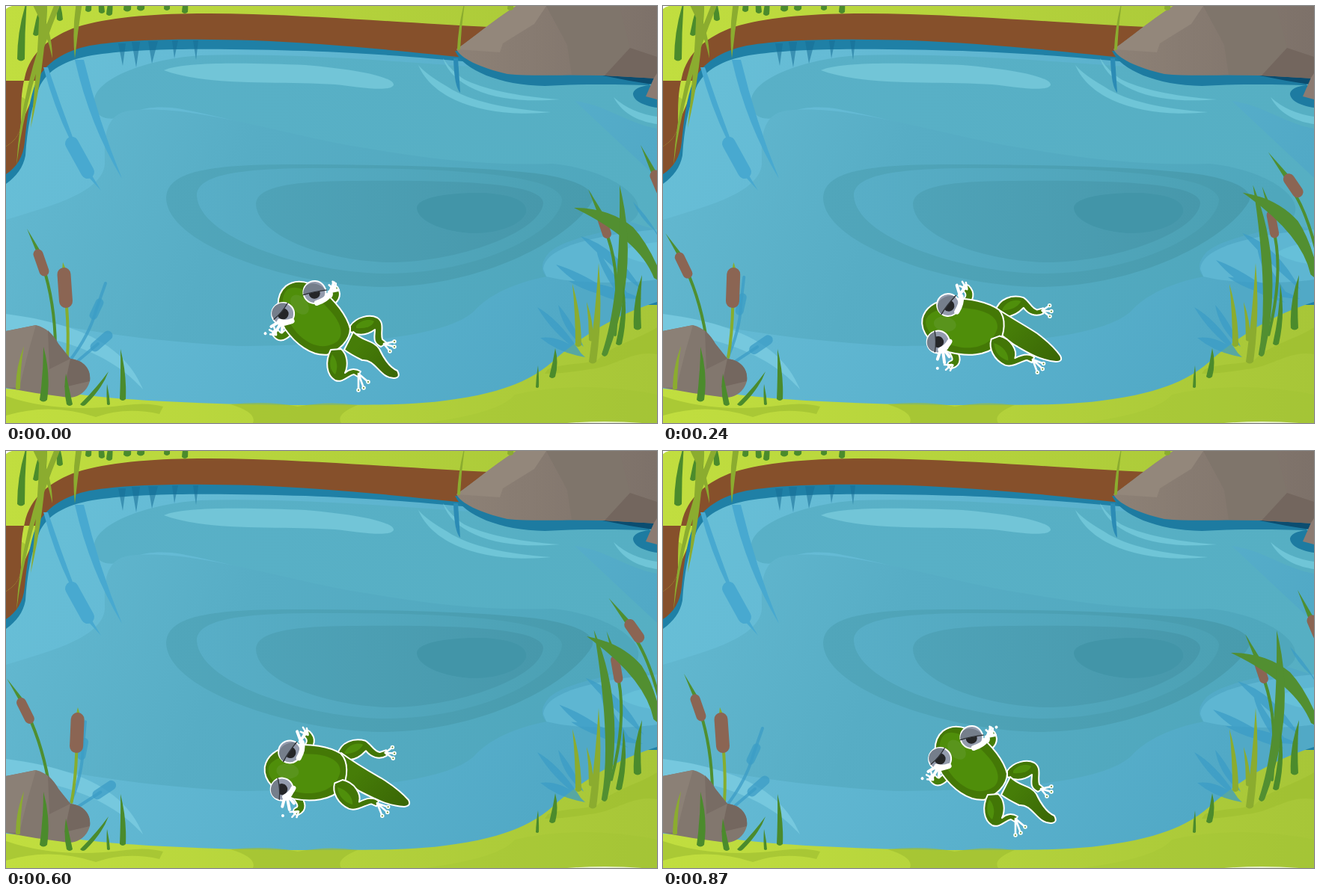
These frames come from a looping animation (870 by 558 pixels, 900 ms). An HTML page:

```html
<!DOCTYPE html>
<html lang="en">
<head>
<meta charset="utf-8">
<title>Frog in a pond</title>
<style>
  html, body { margin: 0; width: 100%; height: 100%; overflow: hidden; background: #b9d63a; }
  svg { display: block; width: 100vw; height: 100vh; }
  .skin { stroke: #fff; stroke-width: 2; stroke-linejoin: round; }
  .line { fill: none; stroke-linecap: round; stroke-linejoin: round; }
  .stem { fill: none; stroke: #4f8f30; stroke-width: 4; stroke-linecap: round; }
  .head { fill: none; stroke: #8b6553; stroke-linecap: round; }
  .mirror { fill: #3b9dc6; opacity: .75; }
  .mirror-line { fill: none; stroke: #3b9dc6; opacity: .75; stroke-linecap: round; }
</style>
</head>
<body>
<svg viewBox="0 0 870 558" preserveAspectRatio="none">
  <defs>
    <linearGradient id="grass"><stop stop-color="#c1de3f"/><stop offset="1" stop-color="#a7c638"/></linearGradient>
    <linearGradient id="water" x2="1" y2=".3"><stop stop-color="#68c0d7"/><stop offset=".25" stop-color="#65bbd5"/><stop offset="1" stop-color="#51a9c6"/></linearGradient>
    <linearGradient id="mid" x2="1" y2=".15"><stop stop-color="#64b9d1"/><stop offset=".4" stop-color="#57adc5"/><stop offset="1" stop-color="#4fa7bc"/></linearGradient>
    <linearGradient id="upper"><stop stop-color="#59b0c7"/><stop offset="1" stop-color="#56afc3"/></linearGradient>
    <linearGradient id="ring"><stop stop-color="#51a6bb"/><stop offset="1" stop-color="#489bad"/></linearGradient>
    <linearGradient id="ringLight"><stop stop-color="#58aec7"/><stop offset="1" stop-color="#4ca1b4"/></linearGradient>
    <linearGradient id="core"><stop stop-color="#4fa3b8"/><stop offset="1" stop-color="#4798ab"/></linearGradient>
    <linearGradient id="stone"><stop stop-color="#8d8176"/><stop offset="1" stop-color="#7d7169"/></linearGradient>
    <linearGradient id="tailSkin" x2="1" y2=".8"><stop offset=".3" stop-color="#467d08"/><stop offset="1" stop-color="#3b6806"/></linearGradient>
  </defs>

  <!-- banks -->
  <rect width="870" height="558" fill="url(#grass)"/>
  <path d="M0 0H8Q3 1 0 4ZM750 558Q800 554 850 558Z" fill="#fff"/>
  <path d="M0 120Q18 118 26 125L20 165 0 186Z" fill="#a9c934"/>
  <path d="M0 188C12 180 19 172 20 158C20 132 20 116 25 96C32 62 60 40 95 28C150 11 240 8 330 11C430 14 560 24 645 28V100H0Z" fill="#86502b"/>
  <path d="M0 188C12 180 19 172 20 158L50 90 60 200 0 240Z" fill="#86502b"/>
  <path d="M0 225C14 216 23 202 25 182C28 150 32 122 40 102C52 76 78 60 112 53C170 43 260 44 330 46C430 50 520 59 640 72H870V400H0Z" fill="#1f80a6"/>
  <path d="M0 238C14 228 23 216 26 200C28 165 34 135 44 110C54 86 80 72 115 66C180 55 300 57 400 60C500 64 570 70 610 74L870 100V396C810 415 770 443 738 469C710 496 680 510 630 521C590 529 555 532 520 533C400 536 200 533 100 520L0 512Z" fill="url(#water)"/>

  <!-- water tones -->
  <path d="M118 128C117 100 180 72 260 66C400 62 560 78 640 82H870V164C830 157 800 132 760 127L870 230V300L600 215C480 200 300 150 235 138C190 130 165 143 148 150C130 153 118 146 118 128Z" fill="url(#upper)"/>
  <path d="M0 286C50 270 128 252 132 212C132 185 128 145 165 140C250 130 380 175 480 190C560 204 640 214 730 211C800 218 850 250 845 275C842 303 760 302 728 328C712 343 716 357 723 362C670 372 640 392 626 408C590 442 470 454 310 455C190 448 120 438 0 414Z" fill="url(#mid)"/>
  <path d="M718 352C720 322 790 306 870 299V366C830 372 760 372 722 362Z" fill="#5eb6d2"/>
  <path d="M820 330Q840 318 870 316V346Q835 342 820 330Z" fill="#66c0d9"/>
  <path d="M0 412C90 424 158 450 183 513C150 476 100 448 0 434Z" fill="#76c8de"/>
  <path d="M211 86C235 74 330 76 400 79C460 84 520 94 518 106C512 116 470 108 440 105C370 100 270 108 211 86Z" fill="#72c5d7"/>
  <path d="M214 256C216 222 270 212 380 212C520 212 660 216 722 226C765 234 790 246 783 262C755 310 640 376 500 376C380 374 214 320 214 256Z" fill="url(#ring)"/>
  <path d="M255 252C258 224 320 217 420 217C560 216 743 222 743 260C738 304 630 360 500 358C390 354 255 308 255 252Z" fill="url(#ringLight)"/>
  <path d="M334 264C336 240 390 234 470 234C600 233 718 236 718 264C714 304 600 344 510 343C420 340 334 306 334 264Z" fill="url(#core)"/>
  <path d="M549 270C550 256 590 250 635 250C680 252 697 262 695 276C690 292 660 304 625 304C590 303 550 290 549 270Z" fill="#4295a8"/>
  <path d="M551 79C572 130 650 150 728 142C670 138 620 128 590 108Q562 92 551 79ZM584 70C598 112 660 132 740 125C680 121 635 110 612 98Q596 88 584 70ZM812 122C825 147 850 155 870 158V148Q835 143 812 122Z" fill="#6fc5d7"/>

  <!-- reflections of the far reeds -->
  <g fill="#48a9d0">
    <path d="M50 82Q64 135 86 180L90 178Q72 130 56 82ZM92 72Q112 160 155 231Q124 155 104 72ZM104 222L127 247 112 222Z"/>
    <path d="M88 184L109 222" class="line" stroke="#48a9d0" stroke-width="18"/>
  </g>
  <path d="M150 50l6 30 4-30M168 48l6 34 5-34M190 47l5 30 8-30M222 46l3 24 5-24M250 46l4 26 3-26" fill="#176d95" opacity=".55"/>

  <!-- right rocks -->
  <path d="M600 60C612 86 660 106 720 107C780 103 840 106 870 106V136C850 133 838 126 838 117Q840 108 860 106L870 70Z" fill="#1d7ba1"/>
  <path d="M598 70h6l3 46q-8-8-9-46Z" fill="#2b8bb5"/>
  <path d="M792 92L870 94V106Q830 100 792 92Z" fill="#0b4d70"/>
  <path d="M602 58C625 42 650 20 682 0H870V97L800 93C760 91 710 95 670 91C632 82 608 70 602 58Z" fill="url(#stone)"/>
  <path d="M602 58C625 42 650 20 682 0H722L706 24 664 50 660 62Z" fill="#93877b"/>
  <path d="M722 0L750 52 756 92 800 93 834 56 820 0Z" fill="#7f756b"/>
  <path d="M834 56L870 68V97L800 93Z" fill="#73665e"/>
  <path d="M855 121L866 96 870 90V125Z" fill="#8c7b72"/>

  <!-- grass patches -->
  <path d="M724 486C745 478 770 480 790 474C812 452 846 446 870 430V466C836 460 812 484 780 486Q745 492 720 492ZM300 533Q350 528 390 536Q430 528 470 534Q440 546 448 558H330Q336 544 300 533ZM0 522Q70 546 160 534Q190 530 210 536L205 546Q160 536 120 550Q60 530 0 548Z" fill="#9fbf30" opacity=".65"/>
  <path d="M680 520Q770 500 870 520V558H560Q660 545 680 520Z" fill="#9dbf33" opacity=".25"/>

  <!-- near reflections -->
  <g data-sway="-17 84 476">
    <path class="mirror-line" stroke-width="4" d="M84 476Q112 440 121 405L133 371"/>
    <path class="mirror-line" stroke-width="11" d="M117 414L125 397"/>
  </g>
  <g data-sway="9 90 480">
    <path class="mirror-line" stroke-width="4" d="M90 480L123 452"/>
    <path class="mirror-line" stroke-width="13" d="M119 456L136 441"/>
  </g>
  <g data-sway="4 850 420" class="mirror">
    <path d="M768 308Q815 322 850 380Q800 342 768 308ZM735 346Q776 358 830 398Q770 384 735 346ZM752 368Q800 368 850 392Q790 392 752 368ZM788 318Q800 345 835 390L815 382Q790 346 788 318Z"/>
  </g>
  <path class="mirror" d="M710 403Q740 420 768 464Q732 440 710 403ZM714 444Q745 440 774 470Q738 464 714 444ZM738 400Q756 420 772 456Q744 434 738 400Z"/>
  <path class="mirror" data-sway="-14 876 387" d="M838 262Q862 286 880 322L866 300Q846 282 838 262Z"/>

  <!-- swaying reeds, left -->
  <g data-sway="-8.8 68 511">
    <path class="stem" d="M66 470Q67 410 53 360"/>
    <path fill="#4f8f30" d="M28 298L46 328 41 330Z"/>
    <path class="head" stroke-width="13" d="M43 332L51 355"/>
  </g>
  <g data-sway="7.8 86 520">
    <path class="stem" stroke="#86ad2e" style="stroke:#86ad2e" d="M82 470Q84 440 81 402"/>
    <path fill="#86ad2e" d="M76 343L80 352H75Z"/>
    <path class="head" stroke-width="18" d="M77.500 359L80 395"/>
  </g>

  <path d="M0 435L40 427C54 430 64 441 70 452L86 472C104 474 114 486 112 502C108 517 96 524 84 524L40 518 0 511Z" fill="#82776e"/>
  <path d="M0 435L40 427 30 462 18 510 0 511Z" fill="#8b8076"/>
  <path d="M56 434Q66 444 70 452L86 472 58 486Z" fill="#786c64"/>
  <path d="M86 472C104 474 114 486 112 502L78 510Z" fill="#74675f"/>

  <!-- swaying reeds, right -->
  <g data-sway="-15 876 387">
    <path class="stem" d="M871 246Q888 290 885 387"/>
    <path fill="#4f8f30" d="M848 186L869 222 863 225Z"/>
    <path class="head" stroke-width="15" d="M868 227L876 246"/>
  </g>
  <g data-sway="10.400 814 407">
    <path class="stem" d="M804 308Q822 360 814 440"/>
    <path fill="#4f8f30" d="M778 245L797 276 791 278Z"/>
    <path class="head" stroke-width="12" d="M795 281L803 305"/>
  </g>
  <path data-sway="11.900 895 358" fill="#528f31" d="M759 270Q806 270 838 296Q862 322 880 372L866 364Q846 312 759 270Z"/>
  <path data-sway="-10.400 800 468" fill="#528f31" d="M820 240Q848 350 804 466Q800 472 796 466Q822 390 820 240Z"/>
  <g id="blades"></g>

  <!-- frog -->
  <g id="frog">
    <path id="legBack" class="skin" fill="#427606"/>
    <path id="shine" fill="#4f8f0b"/>
    <path id="toesBack" class="line"/>
    <path id="tail" class="skin" fill="url(#tailSkin)"/>
    <g id="body">
      <g id="armUp">
        <path class="line" stroke="#fff" stroke-width="12" d="M396 402Q408 390 398 381"/>
        <path class="line" stroke="#457d08" stroke-width="8" d="M396 402Q408 390 398 381"/>
        <path class="line" stroke="#fff" stroke-width="2.500" d="M399 382L389 378M398 381L392 372M399 381L397 373"/>
      </g>
      <g id="armDown">
        <path class="line" stroke="#fff" stroke-width="12" d="M391 466Q406 478 396 485"/>
        <path class="line" stroke="#457d08" stroke-width="8" d="M391 466Q406 478 396 485"/>
        <path class="line" stroke="#fff" stroke-width="2.500" d="M397 485L387 488M396 485L391 494M398 485L397 493"/>
      </g>
      <path class="skin" fill="#447806" d="M345 431C346 414 360 404 378 398C402 393 428 394 444 402C456 412 457 432 451 448C438 466 412 471 388 469C364 464 345 450 345 431Z"/>
      <path fill="#4f8e0a" d="M350 432C352 415 385 407 408 407C430 406 445 413 446 426C445 445 428 459 402 460C372 460 350 448 350 432Z"/>
      <ellipse cx="376" cy="433" rx="15" ry="10" fill="#659c31" opacity=".45"/>
      <g class="eye">
        <circle class="skin" cx="376" cy="407" r="15" fill="#939bad"/>
        <circle cx="377" cy="408" r="7.500" fill="#252628"/>
        <path d="M384 394C374 393 362 400 362 410Q364 419 370 421Q374 408 384 394Z" fill="#757e8b"/>
        <path class="line" stroke="#2d3035" stroke-width="1.300" d="M384 393Q374 408 369 421"/>
      </g>
      <g class="eye">
        <circle class="skin" cx="371" cy="458" r="15" fill="#939bad"/>
        <circle cx="371" cy="458" r="7.500" fill="#252628"/>
        <path d="M365 445C354 450 353 466 364 471L369 472Q369 458 365 445Z" fill="#757e8b"/>
        <path class="line" stroke="#2d3035" stroke-width="1.300" d="M364 444Q369 458 369 472"/>
      </g>
      <g class="line" stroke="#fff">
        <path stroke-width="7" d="M391 393Q394 402 389 414M386 455Q384 462 376 468"/>
        <path stroke-width="4" d="M390 393L383 379M388 392L394 381M376 468L374 481M379 468L384 484M380 466L389 475"/>
      </g>
      <circle cx="376" cy="493" r="2" fill="#fff"/>
      <circle id="drop" cx="387" cy="373" r="2" fill="#fff"/>
    </g>
    <path id="legFront" class="skin" fill="#427606"/>
    <path id="shineFront" fill="#4f8f0b"/>
    <path id="toesFront" class="line"/>
    <g id="tips"></g>
  </g>
</svg>
<script>
const $ = id => document.getElementById(id);
const STEP = 30, COUNT = 30;

// Blades: root x, root y, tip x, tip y, half width, bend
const DARK = '#4b8b2c', PALE = '#8bac2f';
const blades = {
  [DARK]: [
    [50, 527, 50, 456, 5, 5], [85, 533, 80, 492, 4, -2], [103, 533, 137, 489, 4, 5],
    [137, 533, 135, 506, 2, 0], [156, 526, 153, 459, 4, 3], [710, 510, 711, 481, 2, 0],
    [730, 496, 734, 458, 4, 3], [844, 431, 850, 360, 5, -5], [819, 452, 825, 372, 4, 6],
    [20, 71, 28, -8, 5, -4], [49, 30, 54, -10, 4, 0], [40, 38, 48, -8, 4, 0], [72, 18, 70, -10, 4, 0],
    [110, 6, 112, -20, 4, 0], [128, 8, 126, -20, 4, 0], [138, 11, 141, -20, 4, 0],
    [162, 5, 164, -20, 5, 0], [180, 4, 182, -20, 5, 0], [215, 4, 216, -20, 4, 0], [239, 8, 241, -20, 4, 0]
  ],
  [PALE]: [
    [16, 512, 24, 455, 3, -4], [765, 454, 757, 372, 4, 4], [784, 476, 792, 344, 5, 5],
    [782, 447, 776, 396, 3, 3], [605, 58, 614, -10, 2, -3], [70, -5, 14, 213, 4, -18],
    [50, -5, 33, 163, 5, 6], [98, -5, 92, 70, 4, -3], [38, -5, 62, 70, 4, 8], [674, 4, 676, -20, 4, 0]
  ]
};
const blade = ([x, y, tx, ty, w, bend]) => {
  const mx = (x + tx) / 2 + bend, my = (y + ty) / 2, end = y + Math.sign(y - ty) * w;
  return `M${tx} ${ty}Q${mx + w} ${my} ${x + w} ${y}Q${x} ${end} ${x - w} ${y}Q${mx - w} ${my} ${tx} ${ty}Z`;
};
$('blades').innerHTML = Object.entries(blades)
  .map(([fill, list]) => `<path fill="${fill}" d="${list.map(blade).join('')}"/>`).join('');

// Each pair: folded pose, stretched pose
const poses = {
  legBack: [
    'M460 428C468 416 486 412 496 417C507 424 500 436 503 446L509 451L501 456C489 450 493 442 493 433C482 441 470 441 460 436Z',
    'M440 403C444 384 462 379 478 383C486 388 490 396 499 396L508 392L510 400C500 408 486 404 479 396C472 404 460 414 446 406Z'],
  shine: [
    'M468 428C474 420 486 418 492 422C489 430 478 432 468 431Z',
    'M450 399C456 388 466 385 475 388C470 397 460 401 450 401Z'],
  legFront: [
    'M434 460C426 476 428 494 440 501C450 505 458 494 465 493L470 496L474 489C466 484 458 486 453 491C458 480 456 466 448 459Z',
    'M440 442C437 454 446 468 461 475C472 479 484 470 492 469L499 472L502 465C494 458 484 462 475 466C478 456 468 440 450 437Z'],
  shineFront: [
    'M436 466C431 478 433 488 440 493C444 484 443 474 436 466Z',
    'M444 447C446 459 455 467 467 470C467 460 458 450 444 447Z']
};
// Foot, then three toe ends
const feet = {
  toesBack: ['505 452 519 449 519 456 513 462', '507 396 516 388 519 396 518 403'],
  toesFront: ['471 492 484 503 478 511 471 514', '500 468 515 472 515 479 508 484']
};
// The tail wags on its own rhythm
const tailTimes = [0, 4, 8, 12, 20, 24, 29];
const tailPoses = [
  'M464 436C478 450 490 446 499 459C506 474 514 484 523 488Q528 497 519 498C500 499 494 472 476 474C468 470 460 466 452 460Z',
  'M456 420C472 440 490 434 500 446C506 458 518 464 523 468Q529 484 521 486C500 485 490 468 474 464C466 462 460 456 452 448Z',
  'M448 406C470 420 488 430 500 438C512 447 524 458 531 468Q535 476 525 476C504 474 488 464 474 456C466 452 460 446 452 440Z',
  'M446 402C462 418 478 432 492 438C508 444 522 454 532 464Q536 471 526 471C508 470 492 462 476 456C466 451 460 444 452 437Z',
  'M448 404C470 420 488 430 502 438C518 448 530 458 538 467Q542 475 532 476C510 475 490 464 476 457C466 452 460 446 452 440Z',
  'M454 416C472 430 484 436 496 442C510 452 522 462 530 471Q535 481 525 482C504 480 490 472 476 464C466 458 460 452 452 446Z'
];
tailPoses.push(tailPoses[0]);

const mix = (a, b, k) => {
  const to = b.match(/[\d.]+/g);
  let n = 0;
  return a.replace(/[\d.]+/g, v => (+v + (to[n++] - v) * k).toFixed(2));
};

const swayers = [...document.querySelectorAll('[data-sway]')]
  .map(el => [el, ...el.dataset.sway.split(' ').map(Number)]);

for (const id in feet) {
  $(id).setAttribute('stroke', '#fff');
  $(id).setAttribute('stroke-width', 2.6);
}
$('tips').innerHTML = '<path class="line" stroke="#fff" stroke-width="5.5"/><path class="line" stroke="#5c8d22" stroke-width="2"/>';

function drawTail(step) {
  let n = 0;
  while (n < tailTimes.length - 2 && step > tailTimes[n + 1]) n++;
  const k = (step - tailTimes[n]) / (tailTimes[n + 1] - tailTimes[n]);
  $('tail').setAttribute('d', mix(tailPoses[n], tailPoses[n + 1], k));
}

function drawFeet(k) {
  let tips = '';
  for (const id in feet) {
    const [x, y, ...ends] = mix(...feet[id], k).split(' ');
    let d = '';
    for (let n = 0; n < 6; n += 2) {
      d += `M${x} ${y}L${ends[n]} ${ends[n + 1]}`;
      tips += `M${ends[n]} ${ends[n + 1]}h.01`;
    }
    $(id).setAttribute('d', d);
  }
  for (const el of $('tips').children) el.setAttribute('d', tips);
}

const turn = (el, angle, x, y) => el.setAttribute('transform', `rotate(${angle.toFixed(3)} ${x} ${y})`);

function draw() {
  const step = Math.floor(performance.now() / STEP) % COUNT;
  const s = Math.sin(Math.PI * step / (COUNT - 1));
  const k = s / 0.963;
  for (const [el, angle, x, y] of swayers) turn(el, angle * s, x, y);
  for (const id in poses) $(id).setAttribute('d', mix(...poses[id], k));
  turn($('body'), 50 - 53 * s, 420, 434);
  turn($('armUp'), -30 * (1 - k), 400, 397);
  turn($('armDown'), 40 * (1 - k), 395, 469);
  $('drop').setAttribute('opacity', step > 26 ? 1 : 0);
  drawFeet(k);
  drawTail(step);
  requestAnimationFrame(draw);
}
draw();
</script>
</body>
</html>
```
